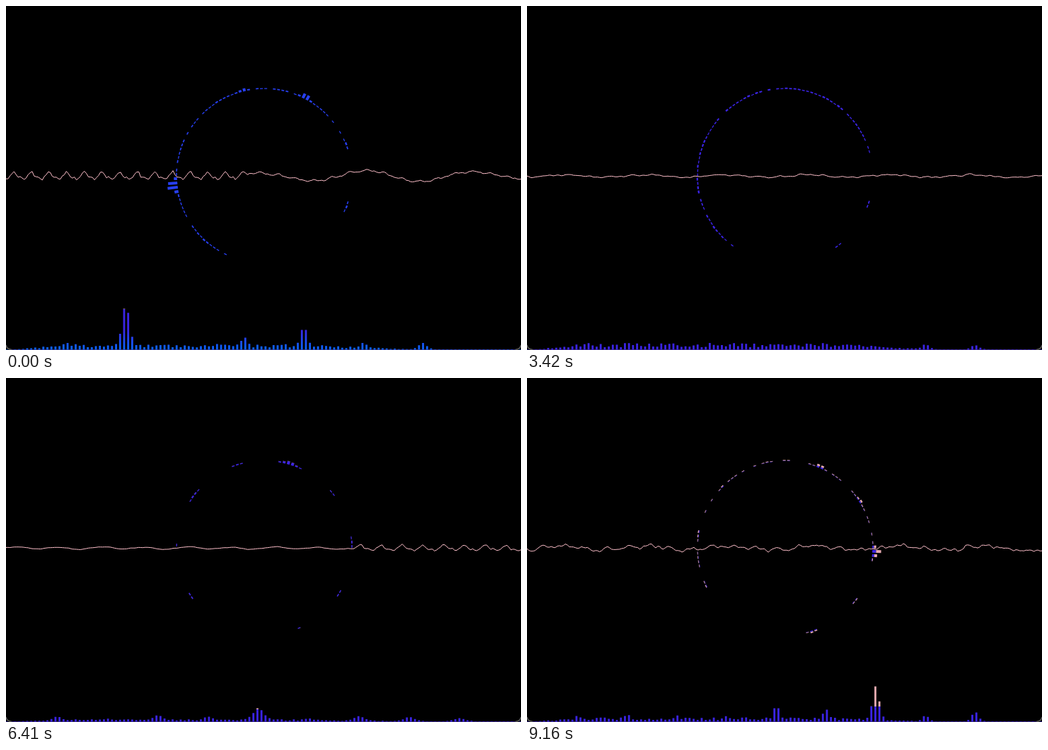
An HTML page for the animation above (9200 ms loop, 728 px wide and 488 px high).

```html
<!DOCTYPE html>
<html lang="en">
<head>
<meta charset="utf-8">
<title>Audio visualizer</title>
<style>
  html, body { margin: 0; width: 100%; height: 100%; overflow: hidden; background: #000; }
  svg { display: block; width: 100%; height: 100%; }
</style>
</head>
<body>
<svg viewBox="0 0 728 488">
  <defs>
    <linearGradient id="heat" gradientUnits="userSpaceOnUse" x1="0" x2="0" y1="488" y2="430">
      <stop offset="0"/>
      <stop offset=".5" stop-color="#3b24e6"/>
      <stop offset="1" stop-color="#3b24e6"/>
      <stop offset="1" stop-color="#e6aab0"/>
    </linearGradient>
  </defs>
  <rect width="728" height="488"/>
  <path d="M8 487.5H720" stroke="#3a2a6c"/>
  <path id="bars" fill="url(#heat)"/>
  <path d="M0 481Q1 487 8 487.5M728 481Q727 487 720 487.5" fill="none" stroke="#555" stroke-width="1.6"/>
  <path id="ring"/>
  <path id="tips" fill="#e6aab0"/>
  <path id="wave" fill="none" stroke="#ffc0cb"/>
</svg>
<script>
const LOOP = 9200, FRAME = 40, BANDS = 128, PITCH = 5.71, FLOOR = 487.5;
const CX = 365, CY = 241, RADIUS = 123.2, QUIET = 4;
const $ = id => document.getElementById(id);
const clamp = v => Math.min(1, Math.max(0, v));
const mix = (a, b, u) => a + (b - a) * u;
const noise = n => { const s = Math.sin(n * 127.1 + 31.7) * 43758.5453; return s - Math.floor(s); };

// root: spacing of the harmonics in bands; soft: their usual height; loud: harmonic -> height
// ripple, drift: wave amplitudes left and right of split
const moments = [
  { at: 0, root: 14.7, soft: 11, hum: 8, fall: .35, loud: { 2: 58, 4: 17, 5: 28 },
    ripple: [5.4, 1.5], drift: [0, 6], split: 335, crest: 11, swell: 165, rough: 1.5 },
  { at: 1300, root: 13.5, soft: 6, hum: 1.5, fall: .2, loud: { 2: 52, 4: 42, 6: 17, 7: 16 },
    ripple: [4.4, 4.4], drift: [.5, .5], split: 728, crest: 33, swell: 200, rough: 1 },
  { at: 3420, root: 12.3, soft: 7, hum: 9, fall: .35, loud: {},
    ripple: [.7, .7], drift: [1.4, 1.4], split: 728, crest: 60, swell: 113, rough: 2 },
  { at: 4970, root: 12.3, soft: 2.5, hum: 1.5, fall: .35, loud: {},
    ripple: [.2, .2], drift: [1.1, 1.1], split: 728, crest: 15, swell: 116, rough: .5 },
  { at: 6410, root: 12.45, soft: 8, hum: 3, fall: .55, loud: { 5: 19 },
    ripple: [.3, 4], drift: [1.4, .5], split: 490, crest: 501, swell: 61, rough: .6 },
  { at: 7460, root: 12.3, soft: 9, hum: 6.5, fall: .4, loud: { 2: 57, 3: 18, 5: 25, 6: 29 },
    ripple: [5.2, 5.2], drift: [.6, .6], split: 728, crest: 4, swell: 180, rough: 1 },
  { at: 9160, root: 12.3, soft: 12, hum: 5.5, fall: .25, loud: { 5: 19, 6: 17, 7: 50 },
    ripple: [2, 2], drift: [2.4, 2.4], split: 728, crest: 54, swell: 119, rough: 5 }
];

function spectrum(m, seed) {
  return Array.from({ length: BANDS }, (_, i) => {
    const taper = clamp((i - 2) / 12) * clamp((100 - i) / 25);
    let h = .4 + m.hum * (.35 + .65 * noise(i + seed)) * taper;
    for (let n = 1; n * m.root < 115; n++) {
      const top = m.loud[n] ?? m.soft * (.5 + .6 * noise(n * 7 + seed));
      const away = Math.max(0, Math.abs(i - n * m.root) - .5);
      h = Math.max(h, top * m.fall ** away);
    }
    return h;
  });
}
moments.forEach((m, k) => { m.levels = spectrum(m, k * 200); });

function grain(x) {
  const n = Math.floor(x), f = x - n;
  return mix(noise(n), noise(n + 1), f * f * (3 - 2 * f)) - .5;
}

function waveAt(m, x, shift) {
  const s = x + shift, side = clamp((x - m.split + 10) / 20);
  const a = 2 * Math.PI * (s - m.crest) / (367 / m.root);
  const ripple = .85 * Math.cos(a) + .32 * Math.cos(2 * a + .7) + .18 * Math.cos(3 * a - 1) + .13 * Math.sin(4.13 * a);
  const drift = Math.cos(2 * Math.PI * (s - m.crest) / m.swell) + .35 * Math.sin(s / 19.3);
  return m.rough * grain(s / 5.5) - mix(...m.ripple, side) * ripple - mix(...m.drift, side) * drift;
}

function ringBar(angle, from, to) {
  const c = Math.cos(angle), s = Math.sin(angle);
  const p = (r, w) => (CX + r * c - w * s).toFixed(2) + ' ' + (CY + r * s + w * c).toFixed(2);
  return `M${p(from, -2)}L${p(to, -2)} ${p(to, 2)} ${p(from, 2)}Z`;
}

const violet = u => `rgb(${mix(8, 59, u)},${mix(104, 36, u)},${mix(255, 230, u)})`;
const heat = $('heat'), stops = heat.children;

function draw(t) {
  const k = moments.findLastIndex(m => m.at <= t);
  const a = moments[k], b = moments[k + 1] || a;
  const now = a.at + Math.floor((t - a.at) / FRAME) * FRAME;
  const u = a === b ? 0 : (now - a.at) / (b.at - a.at);
  const spin = (91 + now * .0032) * Math.PI / 180;
  const cool = clamp(now / 3000);
  const pink = clamp((now - 6000) * .00018);

  let bars = '', ring = '', tips = '', tallest = 1;
  for (let i = 0; i < BANDS; i++) {
    const h = mix(a.levels[i], b.levels[i], u);
    tallest = Math.max(tallest, h);
    bars += `M${(i * PITCH).toFixed(2)} ${FLOOR}v${-h.toFixed(2)}h2.8V${FLOOR}Z`;
    if (h < QUIET) continue;
    const angle = spin + i * 2 * Math.PI / BANDS;
    const outer = RADIUS + Math.max(1.3, h * .25);
    const edge = mix(outer, RADIUS, pink);
    ring += ringBar(angle, RADIUS, edge);
    if (pink) tips += ringBar(angle, edge, outer);
  }
  $('bars').setAttribute('d', bars);
  $('ring').setAttribute('d', ring);
  $('tips').setAttribute('d', tips);

  heat.setAttribute('y2', FLOOR - tallest);
  stops[0].setAttribute('stop-color', violet(cool));
  stops[1].setAttribute('offset', Math.min(.5, 1 - pink));
  stops[2].setAttribute('offset', 1 - pink);
  stops[3].setAttribute('offset', 1 - pink);
  $('ring').setAttribute('fill', violet(mix(.6, 1, cool)));

  const line = [];
  for (let i = 0; i <= 256; i++) {
    const x = i * 728 / 256;
    const y = mix(waveAt(a, x, (now - a.at) * .13), waveAt(b, x, (now - b.at) * .13), u);
    line.push(x.toFixed(1) + ' ' + (241.3 + y).toFixed(2));
  }
  $('wave').setAttribute('d', 'M' + line.join('L'));
}

const start = performance.now();
function tick() {
  draw((performance.now() - start) % LOOP);
  requestAnimationFrame(tick);
}
tick();
</script>
</body>
</html>
```
